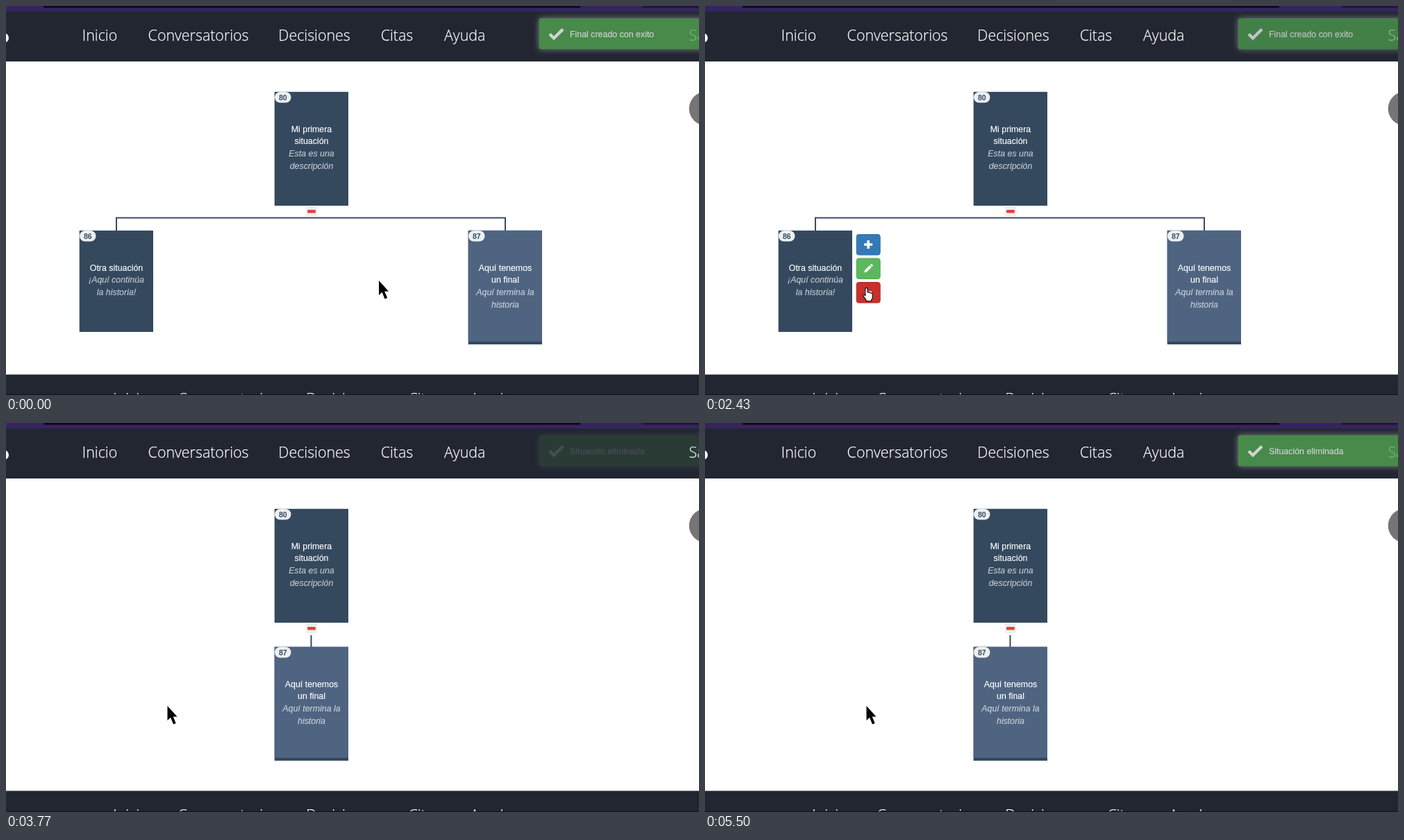
An HTML page that plays this animation: 998 px wide and 561 px high, repeating every 5530 ms.

```html
<!DOCTYPE html>
<html lang="es">
<head>
<meta charset="utf-8">
<style>
  html, body { margin: 0; width: 100%; height: 100%; overflow: hidden; background: #fff; }
  svg { display: block; width: 998px; height: 561px; }
  text { font: 12.4px "Liberation Sans", Arial, sans-serif; fill: #fff; stroke: #fff; stroke-width: .15; }
  .nav text { font: 300 21.4px "Open Sans", sans-serif; fill: #f8f9fa; stroke-width: .25; }
  .card text { text-anchor: middle; }
  .card .desc { font-style: italic; opacity: .7; }
  .card .id { font-size: 10.6px; font-weight: bold; fill: #34495e; stroke: none; }
  .line { fill: none; stroke: #3b4a66; stroke-width: 2; }
  .shadow { filter: drop-shadow(0 0 5px #999); }
</style>
</head>
<body>
<svg id="stage" viewBox="0 0 998 561"></svg>
<script>
const LOOP = 5530, SWAP = 3700;
const $ = id => document.getElementById(id);

const rect = (x, y, w, h, fill, extra = '') =>
  `<rect x="${x}" y="${y}" width="${w}" height="${h}" fill="${fill}" ${extra}/>`;

const menu = (labels, y) => '<g class="nav">' +
  labels.map(([x, s]) => `<text x="${x}" y="${y}">${s}</text>`).join('') + '</g>';

function card(x, y, h, id, title, desc, final) {
  const lines = [...title.map(s => [s, '']), ...desc.map(s => [s, 'desc'])];
  return `<g class="card" transform="translate(${x} ${y})">` +
    rect(-.3, -.2, 106.3, h + .2, '#34495e') +
    (final ? rect(-.3, -.2, 106.3, h - 4, '#4f6481') : '') +
    rect(0, 0, 23.5, 15.5, '#ecf0f1', 'rx="7.75"') +
    `<text class="id" x="11.8" y="11.6">${id}</text>` +
    lines.map(([s, c], i) => `<text class="${c}" x="53" y="${57.5 + i * 17.7}">${s}</text>`).join('') +
    '</g>';
}

function buttons(id, x, y) {
  const colors = [['#337ab7', '#2e6da4'], ['#5cb85c', '#4cae4c'], ['#d9534f', '#d43f3a']];
  const icons = ['M-6-1.8h4.2V-6h3.6v4.2H6v3.6H1.8V6h-3.6V1.8H-6z',
                 'M-6 6l1-3.8 6.8-6.8 2.9 2.9-6.8 6.8zM2.6-5.3l1-1q.7-.5 1.4 0l1.4 1.4q.5.7 0 1.4l-1 1z',
                 'M-5-1.6H5V1.6H-5z'];
  return `<g id="${id}" transform="translate(${x} ${y})">` +
    colors.map(([fill, edge], i) => `<g transform="translate(0 ${i * 34.5})">` +
      rect(.5, .5, 34, 29.5, fill, `stroke="${edge}" rx="3.2"`) +
      `<path transform="translate(17.5 15)" fill="#fff" d="${icons[i]}"/></g>`).join('') + '</g>';
}

const root = card(387, 124, 164, 80, ['Mi primera', 'situación'], ['Esta es una', 'descripción']);
const ending = (x, y) =>
  card(x, y, 164, 87, ['Aquí tenemos', 'un final'], ['Aquí termina la', 'historia'], true);

$('stage').innerHTML =
  rect(0, 0, 998, 10, '#35245f') + rect(54, 0, 773, 2.5, '#0b0716') + rect(917, 0, 81, 2.5, '#1d1436') +
  rect(0, 8, 998, 72, '#222631') +
  '<circle cx="-3" cy="46" r="7" fill="#fff"/>' +
  menu([[109.8, 'Inicio'], [204.6, 'Conversatorios'], [392.3, 'Decisiones'],
        [539.7, 'Citas'], [631, 'Ayuda'], [983.5, 'Salir']], 50) +
  '<circle cx="1008" cy="148" r="24.3" fill="#757575"/>' +
  root +
  rect(432, 289, 16, 14, '#eeeeee') + rect(434, 294, 12, 4.5, '#df4437', 'rx="1.5"') +
  '<g id="before"><path class="line" d="M159 324V305.5H719V324"/>' +
  card(106, 324, 146, 86, ['Otra situación'], ['¡Aquí continúa', 'la historia!']) +
  ending(666, 324) + '</g>' +
  '<g id="after"><path class="line" d="M439.5 306V323"/>' + ending(387, 323) + '</g>' +
  buttons('tools80', 498, 129) + buttons('tools86', 217.7, 329) +
  '<g id="footer">' + rect(0, 531.5, 998, 32, '#222631') +
  menu([[154.3, 'Inicio'], [247.6, 'Conversatorios'], [432.3, 'Decisiones'],
        [579.5, 'Citas'], [668.5, 'Ayuda']], 573.5) + '</g>' +
  rect(0, 560, 998, 1, '#101218') +
  '<g id="toast">' + rect(767.7, 17.7, 266, 44.6, '#51a351', 'rx="2.7" class="shadow"') +
  '<path d="M783 40.5L789 46.5L802 33.5" fill="none" stroke="#fff" stroke-width="4.4"/>' +
  '<text id="message" x="812" y="44.6"></text></g>' +
  '<path id="arrow" fill="#000" d="M0 0V21L4.6 16.8L8.5 26.5L12.2 25L8.2 15.4H14z"/>' +
  '<path id="hand" fill="#fff" stroke="#000" stroke-width="1.1" stroke-linejoin="round" ' +
  'd="M-1.6 1.5Q0-.8 1.6 1.5V7Q3 5.8 4.3 7.4Q5.8 6.6 6.7 8.2Q8.6 7.8 8.8 9.8V14Q8.6 16.5 7.2 17.5V19.5H-.6V17.6' +
  'L-4.6 12.4Q-5.6 10.6-4.2 10.2Q-3.2 10-1.6 12z"/>';

// time, x, y of the pointer tip
const path = [[0, 537, 396], [30, 537, 396], [300, 440, 262], [560, 335, 245], [700, 333, 248],
              [1130, 326, 262], [1450, 179.5, 402], [1930, 179.5, 402], [2400, 232.5, 406],
              [2600, 232.5, 406], [3100, 232.5, 408], [LOOP, 232.5, 408]];

const ramp = (t, a, b) => Math.min(1, Math.max(0, (t - a) / (b - a)));
const swing = p => .5 - Math.cos(p * Math.PI) / 2;

function pointer(t) {
  const i = path.findIndex(k => t < k[0]);
  const [a, b] = [path[i - 1], path[i]], p = ramp(t, a[0], b[0]);
  return [a[1] + (b[1] - a[1]) * p, a[2] + (b[2] - a[2]) * p];
}

function draw(t) {
  const deleted = t >= SWAP;
  const [x, y] = pointer(t);
  const onRoot = x > 387 && x < 493 && y > 124 && y < 288;
  const onChild = !deleted && x > 106 && (x < 212 || t > 1400) && y > 324;
  const show = (id, on) => $(id).style.display = on ? '' : 'none';
  const fade = (id, o) => { show(id, o > 0); $(id).style.opacity = o; };

  show('before', !deleted);
  show('after', deleted);
  $('footer').setAttribute('transform', `translate(0 ${deleted ? -1 : 0})`);

  fade('tools80', ramp(t, 260, 430) - ramp(t, 750, 1050));
  fade('tools86', deleted ? 0 : ramp(t, 1370, 1540));
  const remove = $('tools86').querySelectorAll('rect')[2];
  const hover = x > 217.7 && t > 1930;
  remove.setAttribute('fill', hover ? '#c9302c' : '#d9534f');
  remove.setAttribute('stroke', hover ? '#ac2925' : '#d43f3a');

  fade('toast', .8 * (deleted ? swing(ramp(t, SWAP, SWAP + 230)) : 1 - swing(ramp(t, 2250, 3150))));
  $('message').textContent = deleted ? 'Situación eliminada' : 'Final creado con exito';

  const hand = onRoot || onChild;
  show('hand', hand);
  show('arrow', !hand);
  $(hand ? 'hand' : 'arrow').setAttribute('transform', `translate(${x} ${y})`);
}

const start = performance.now();
function tick() {
  draw((performance.now() - start) % LOOP);
  requestAnimationFrame(tick);
}
tick();
</script>
</body>
</html>
```
